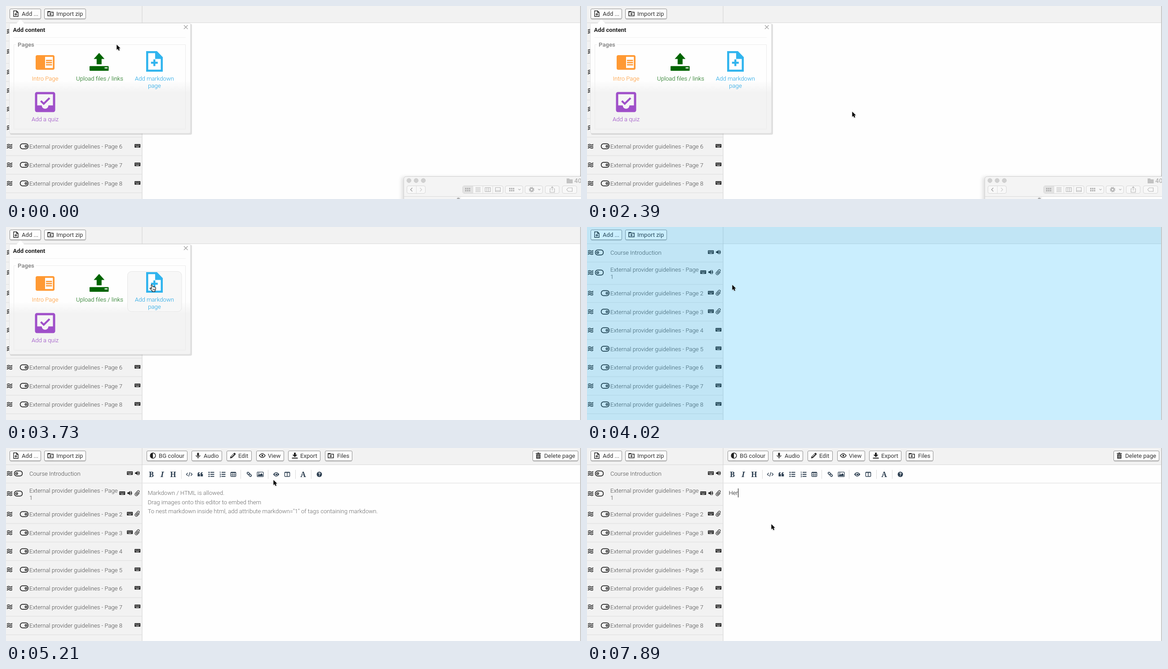
These frames come from a looping animation (1280x432 px, 8 s). An HTML page:

```html
<!DOCTYPE html>
<html lang="en">
<head>
<meta charset="utf-8">
<title>Add markdown page</title>
<style>
html, body { margin: 0; width: 100%; height: 100%; overflow: hidden; background: #fefefe; }
svg { display: block; width: 100%; height: 100%; }
text { font: 300 13.12px Roboto, sans-serif; white-space: pre; }
.btn text { font-weight: 400; fill: #333; }
.bold { font-weight: 700; }
.serif text { font: 700 16.5px "Noto Serif", serif; fill: #2c3e50; text-anchor: middle; }
.mid { text-anchor: middle; }
</style>
</head>
<body>
<svg id="stage" viewBox="0 0 1280 432"></svg>
<script>
const LOOP = 8000, TICK = 148.6;
const NAVY = '#2c3e50', INK = '#222', LABEL = '#484848';

const rect = (x, y, w, h, fill, more = '') =>
  `<rect x="${x}" y="${y}" width="${w}" height="${h}" fill="${fill}" ${more}/>`;
const path = (d, fill = INK, more = '') => `<path d="${d}" fill="${fill}" ${more}/>`;
const line = (d, color = INK, width = 1.5, more = '') =>
  path(d, 'none', `stroke="${color}" stroke-width="${width}" ${more}`);
const text = (x, y, s, fill, cls = '') => `<text x="${x}" y="${y}" fill="${fill}" class="${cls}">${s}</text>`;
const dot = (x, y, r, fill, more = '') => `<circle cx="${x}" cy="${y}" r="${r}" fill="${fill}" ${more}/>`;
const group = (body, more = '') => `<g ${more}>${body}</g>`;
const at = (x, y, body, scale = 1) => group(body, `transform="translate(${x} ${y}) scale(${scale})"`);

// Icons are centred on 0,0
const icon = {
  page: line('M-5 -6.2H1.5L5 -2.7V6.2H-5ZM1.5 -6V-2.5H5', INK, 1.4) + line('M0 -1.5V4.5M-3 1.5H3', INK, 1.4),
  folder: line('M-6 -4.8H-1.5L0 -3.2H6V5H-6Z', INK, 1.5) + path('M-6 -5H-1.5L0 -3H-6Z') + line('M0 -1.6V3.6M-2.6 1H2.6', INK, 1.4),
  contrast: dot(0, 0, 5.9, 'none', `stroke="${INK}" stroke-width="1.5"`) + path('M0 -6A6 6 0 0 0 0 6Z'),
  mic: rect(-2, -6.5, 4, 8.2, INK, 'rx="2"') + line('M-4.3 -1A4.3 4.3 0 0 0 4.3 -1M0 3.3V6.5', INK, 1.4),
  pencil: path('M-6.3 6.3L-5.2 2L2.6 -5.8Q3.6 -6.8 4.6 -5.8L5.8 -4.6Q6.8 -3.6 5.8 -2.6L-2 5.2Z')
    + line('M-3.6 2.7L2.6 -3.5', '#fff', 1.3),
  eye: line('M-6.5 0Q0 -8.6 6.5 0Q0 8.6 -6.5 0Z', INK, 1.4) + dot(0, 0, 2, INK),
  download: path('M-2 -6.5H2V-2H5.5L0 3.5L-5.5 -2H-2Z') + rect(-6.5, 4.6, 13, 2, INK),
  bin: path('M-5.5 -5.5H-2L-1.3 -6.8H1.3L2 -5.5H5.5V-3.8H-5.5ZM-4.6 -2.8H4.6V6.8H-4.6Z')
    + line('M-2.1 -1.3V5.3M0 -1.3V5.3M2.1 -1.3V5.3', '#fff', 0.9),
  keys: rect(-6.5, -4, 13, 8, INK, 'rx="1"') + line('M-5 -2H5.5M-5 0H5.5', '#eee', 1.2, 'stroke-dasharray="1.2 0.9"')
    + line('M-3.2 2.2H3.2', '#eee', 1.1),
  sound: path('M-5.5 -1.8H-3L0.4 -5V5L-3 1.8H-5.5Z') + line('M1.8 -2.2Q3.6 0 1.8 2.2M2 -4.4Q7 0 2 4.4', INK, 1.3),
  clip: group(line('M3.2 -3V3.6A3.2 3.2 0 0 1 -3.2 3.6V-4A2.2 2.2 0 0 1 1.2 -4V3A1 1 0 0 1 -1 3V-3', INK, 1.1),
    'transform="rotate(42)"'),
  waves: line([-3.6, 0, 3.6].map(y => `M-5.8 ${y + 1}Q-3 ${y - 2.2} 0 ${y}T5.8 ${y - 1}`).join(''), INK, 1.6),
};

const toggle = (x, y, on) =>
  rect(x - 8.8, y - 5.6, 17.6, 11.2, 'none', `rx="5.2" stroke="${INK}" stroke-width="1.7"`)
  + dot(x + (on ? 4 : -3.6), y, 2, 'none', `stroke="${INK}" stroke-width="1.7"`);

const button = (x1, x2, ic, ix, tx, label) => group(
  rect(x1 + .5, 8, x2 - x1 - 1, 22.5, '#000', 'opacity=".16" rx="3"')
  + rect(x1 + .5, 6.5, x2 - x1 - 1, 22, '#fdfdfd', 'rx="2.5" stroke="#8c8c8c"')
  + at(ix, 17, icon[ic]) + text(tx, 22, label, '#333'), 'class="btn"');

function row(y, i) {
  const icons = i === 0 ? ['keys', 'sound'] : i === 1 ? ['keys', 'sound', 'clip'] : i < 4 ? ['keys', 'clip'] : ['keys'];
  const label = i === 0 ? text(52, y + 5, 'Course Introduction', LABEL)
    : i === 1 ? text(52, 99.5, 'External provider guidelines - Page', LABEL) + text(52, 115.5, '1', LABEL)
    : text(52, y + 5, 'External provider guidelines - Page ' + i, LABEL);
  return at(8, y, icon.waves) + toggle(i > 1 ? 40.5 : 27.5, y, i > 1) + label
    + icons.map((n, j) => at(292.7 - 17 * (icons.length - 1 - j), y - (i ? 1 : .7), icon[n])).join('')
    + rect(0, i > 1 ? y + 20.5 : i ? 128 : 78, 303, 1, '#dedede');
}

const rowY = i => i === 0 ? 57 : i === 1 ? 102 : 148 + 41.5 * (i - 2);
const base = rect(0, 0, 1280, 432, '#fefefe') + rect(0, 0, 1278, 37, '#f2f2f2')
  + rect(0, 37, 303, 395, '#f2f2f2') + rect(0, 37, 1278, 1, '#dadada')
  + rect(302.5, 0, 1, 432, '#cfcfcf') + rect(1278, 0, 2, 432, '#c9c9c9')
  + Array.from({ length: 9 }, (_, i) => row(rowY(i), i)).join('')
  + button(8, 78, 'page', 22, 35, 'Add ...') + button(85, 178, 'folder', 99, 112, 'Import zip');

const actions = button(313, 404, 'contrast', 327, 340, 'BG colour') + button(413, 481, 'mic', 427.5, 440, 'Audio')
  + button(491, 547, 'pencil', 505, 517, 'Edit') + button(557, 619, 'eye', 570.5, 583, 'View')
  + button(628, 700, 'download', 643, 655, 'Export') + button(710, 771, 'folder', 723, 737, 'Files')
  + button(1172, 1274, 'bin', 1185, 1198, 'Delete page');

const upload = path('M207.3 105L219.3 118.5H212.8V130.5H201.8V118.5H195.3Z', '#006400')
  + rect(186, 134.5, 42.5, 10.5, '#006400', 'rx="1"') + rect(219.5, 137.3, 6.5, 2.4, '#fff');
const intro = rect(66, 110, 42, 32.7, '#ff9933', 'rx="3.8"') + rect(87, 113.8, 17.3, 25, '#fff')
  + line('M89 122H102.5M89 126.8H102.5M89 131.6H102.5', '#ff9933', 2.9);
const markdown = path('M312 101H336L349 114.5V147H312Z', '#30b4ee')
  + path('M316.6 105.5H332V118.5H344.5V142.5H316.6Z', '#fff')
  + line('M330.3 119.5V134.5M322.8 127H337.8', '#30b4ee', 4.4);
const quiz = rect(64.5, 192.5, 45, 45, '#9f4fc9', 'rx="4.5"')
  + path('M69.5 197.5H104.5V222.5H94.5Q93.5 230 87 230T79.5 222.5H69.5Z', '#f6f6f6')
  + line('M77.5 212.5L84 218.8L97 206', '#9f4fc9', 4.2);

const popup = rect(9, 40, 405, 248, '#000', 'opacity=".12" rx="3"')
  + rect(7.5, 38.5, 403, 246.5, 'url(#fade)', 'rx="3" stroke="#e2e2e2"')
  + path('M23 39.5L32 30L41 39.5Z', '#fefefe')
  + text(15.5, 58, 'Add content', INK, 'bold')
  + line('M396 43L404.5 51.5M404.5 43L396 51.5', '#a0a0a0', 1.3)
  + rect(16, 70, 384, 1, '#f1f1f1')
  + line('M22 86.5H17.5V275.5H399.5V86.5H66', '#ebebeb', 1) + text(26, 91, 'Pages', '#8d8d8d', 'bold')
  + rect(270.5, 99.5, 120.5, 90, '#f7f7f7', 'id="hover" rx="9" stroke="#e6e6e6"')
  + intro + upload + markdown + quiz
  + text(87, 167, 'Intro Page', '#ff8f20', 'mid') + text(208.5, 167, 'Upload files / links', '#006400', 'mid')
  + text(330.5, 167, 'Add markdown', '#12a0e4', 'mid') + text(330.5, 183.3, 'page', '#12a0e4', 'mid')
  + text(87, 258, 'Add a quiz', '#9440c2', 'mid');

const GREY = '#b3b3b3';
const box = (x1, x2, split = []) => rect(x1 + .5, 402.5, x2 - x1, 17, '#f8f8f8', 'rx="3.5" stroke="#d6d6d6"')
  + split.map(x => rect(x, 403, 1, 16, '#dedede')).join('');
const squares = (x, y) => [0, 1, 2].map(i => [0, 1].map(j => rect(x + i * 4.2, y + j * 4.6, 3, 3.4, GREY)).join('')).join('');
const finder = rect(881, 383, 420, 60, '#000', 'opacity=".13" filter="url(#soft)"')
  + rect(885.5, 381.5, 410, 70, '#f4f4f4', 'rx="6" stroke="#cfcfcf"')
  + [897, 913, 929].map(x => dot(x, 390.7, 4.8, '#d0d0d0', 'stroke="#bfbfbf" stroke-width=".6"')).join('')
  + path('M1248 386H1253.5L1255 388H1261.5V397H1248Z', '#c2c2c2')
  + `<text x="1265" y="395.5" fill="#aaa" style="font:500 12.5px Inter,sans-serif">400</text>`
  + box(892, 933, [913]) + line('M904.5 407L900.5 411L904.5 415', '#9c9c9c', 1.3) + line('M921.5 407L925.5 411L921.5 415', '#d0d0d0', 1.3)
  + box(1016, 1106, [1039, 1061, 1083]) + rect(1017, 403, 22, 16, '#e3e3e3') + squares(1022, 407)
  + line('M1045 406.5H1056.5M1045 409.5H1056.5M1045 412.5H1056.5M1045 415.5H1056.5', GREY, 1.1)
  + line('M1066.5 406.5H1078.5V415.5H1066.5ZM1070.5 406V416M1074.5 406V416M1089.5 406.5H1100.5V415.5H1089.5ZM1089.5 413H1100.5', GREY, 1.1)
  + box(1111, 1150) + squares(1120, 407) + box(1155, 1194)
  + dot(1170, 411, 3.4, 'none', `stroke="${GREY}" stroke-width="2.6"`)
  + dot(1170, 411, 5.4, 'none', `stroke="${GREY}" stroke-width="1.6" stroke-dasharray="2.1 2.1"`)
  + line('M1140.5 409.5L1143 412L1145.5 409.5M1184.5 409.5L1187 412L1189.5 409.5', GREY, 1.2)
  + box(1200, 1231) + line('M1213 409H1211V417H1221V409H1219M1216 413V405M1213.5 407L1216 404.5L1218.5 407', GREY, 1.1)
  + box(1238, 1270) + line('M1248 411L1251.5 407H1260.5V415H1251.5Z', GREY, 1.1)
  + rect(885.5, 426, 400, 1, '#d9d9d9') + rect(1013, 427, 270, 5, '#fefefe') + dot(1007, 432, 3.3, '#b0b0b0');

const tool = (x, body) => at(x, 59, body);
const lines = line([-4.5, 0, 4.5].map(y => `M-2 ${y}H6.5`).join(''), NAVY, 2);
const frame = rect(-5.6, -4.8, 11.2, 9.6, 'none', `rx="1" stroke="${NAVY}" stroke-width="1.4"`);
const tools = rect(304, 38, 974, 40, '#fefefe') + rect(304, 78, 974, 1, '#dcdcdc')
  + [390, 522, 583, 644, 679].map(x => rect(x, 49, 1, 20, '#d9d9d9')).join('')
  + group(text(323.5, 65, 'B', NAVY) + `<text x="347.5" y="65" style="font-style:italic">I</text>`
    + text(372, 65, 'H', NAVY) + text(661.5, 65, 'A', NAVY), 'class="serif"')
  + tool(408, line('M-3.4 -3.2L-6.4 0L-3.4 3.2M3.4 -3.2L6.4 0L3.4 3.2M1.4 -4.8L-1.4 4.8', NAVY, 1.4))
  + tool(432.5, [-6, .6].map(x => path(`M${x} -1Q${x} -5 ${x + 4.5} -4.8V-3.2Q${x + 2.6} -3 ${x + 2.6} -.8H${x + 5.2}V4.4H${x}Z`, NAVY)).join(''))
  + tool(457, lines + [-4.5, 0, 4.5].map(y => dot(-5, y, 1.5, NAVY)).join(''))
  + tool(482, lines + line('M-6.2 -5L-5 -6V-2.8M-6.3 -.8H-4V.8H-6M-6.3 3.2H-4V5.8H-6.3', NAVY, 1))
  + tool(506, frame + line('M-5.6 -4H5.6', NAVY, 2) + line('M-5.6 1H5.6M-1.9 -4V5M1.9 -4V5', NAVY, 1.1))
  + tool(541.5, group([-2.9, 2.9].map(x => rect(x - 3, -2, 6, 4, 'none', `rx="2" stroke="${NAVY}" stroke-width="1.6"`)).join(''),
    'transform="rotate(45)"'))
  + tool(566, rect(-6.8, -5.2, 13.6, 10.4, 'none', `rx="1" stroke="${NAVY}" stroke-width="1.3"`)
    + path('M-5.4 3.8V1.6L-2.6 -1L-.8 .8L2.5 -2.6L5.4 .4V3.8Z', NAVY) + dot(-3.2, -2.5, 1.2, NAVY))
  + tool(601.5, path('M-6.8 0Q0 -9.6 6.8 0Q0 9.6 -6.8 0Z', NAVY) + dot(0, 0, 3.2, '#fff') + dot(.3, .3, 2, NAVY))
  + tool(626, frame + line('M-5.6 -4.3H5.6', NAVY, 1.8) + line('M0 -4V5', NAVY, 1.4))
  + tool(697.5, dot(0, 0, 5.9, NAVY) + `<text class="mid" y="3.9" fill="#fff" style="font-weight:700;font-size:10.5px">?</text>`);

const hint = ['Markdown / HTML is allowed.', 'Drag images onto this editor to embed them',
  'To nest markdown inside html, add attribute markdown="1" of tags containing markdown.']
  .map((s, i) => text(315.5, 105 + 20.5 * i, s, '#666')).join('');

const arrow = at(.4, .6, path('M0 0V13.6L3.1 10.8L5.3 15.8L7.9 14.7L5.7 9.8H9.8Z', '#000',
  'stroke="#fff" stroke-width="1" paint-order="stroke" filter="url(#drop)"'), .84);
const hand = path('M0 1.2Q1.3 -.6 2.6 1.2L3.6 5Q5 4 5.9 5.2Q7.4 4.4 8.2 5.8Q10 5.4 10.2 7V10.5L8.6 13V15.5H2.4V13.6L-2.6 8.6Q-2.8 6.8 -.6 7.6L1.4 9Z',
  '#fff', 'stroke="#000" stroke-width="1.1" stroke-linejoin="round"') + line('M4.3 9.2V12.6M6.2 9.2V12.6M8 9.2V12.6', '#000', .8);

const stage = document.getElementById('stage');
stage.innerHTML = `<defs>
  <linearGradient id="fade" x2="0" y2="1"><stop offset=".52" stop-color="#fefefe"/><stop offset=".63" stop-color="#f3f3f3"/></linearGradient>
  <filter id="soft" x="-10%" y="-60%" width="120%" height="220%"><feGaussianBlur stdDeviation="4"/></filter>
  <filter id="drop" x="-50%" y="-30%" width="200%" height="170%"><feDropShadow dx="0" dy="1" stdDeviation="1" flood-opacity=".25"/></filter>
  </defs>` + base + group(actions, 'id="actions"') + group(popup, 'id="popup"') + group(finder, 'id="finder"')
  + group(tools + group(hint, 'id="hint"') + `<text id="typed" x="315.5" y="105" fill="#111"/>`
    + rect(315, 90.5, 1.2, 20, '#222', 'id="caret"'), 'id="editor"')
  + rect(0, 0, 1278, 432, '#00b0ff', 'id="flash" opacity=".205"')
  + group(group(arrow, 'id="arrow"') + group(hand, 'id="hand"'), 'id="cursor"');

const $ = Object.fromEntries([...stage.querySelectorAll('g[id],rect[id],text[id]')].map(e => [e.id, e]));
const show = (id, on) => { $[id].style.display = on ? '' : 'none'; };

// Pointer stops: tick, x, y
const stops = [[0, 246, 86], [1, 214, 62], [2, 262, 33], [4, 680, 150], [6, 1150, 350], [7, 1254, 383],
  [9, 1262, 398], [11, 1285, 436], [15, 1285, 436], [16, 590, 236], [18, 590, 236], [21, 385, 146],
  [23, 323, 129], [28, 323, 129], [31, 515, 14], [32, 515, 14], [34, 690, 12], [36, 500, 130], [38, 410, 170]];

function pointer(k) {
  const i = stops.findIndex(s => s[0] > k);
  if (i < 0) return stops[stops.length - 1].slice(1);
  const [a, x, y] = stops[i - 1], [b, u, v] = stops[i], p = (k - a) / (b - a);
  return [x + (u - x) * p, y + (v - y) * p];
}

function draw(t) {
  const k = Math.floor((t + 6) / TICK);
  const [x, y] = pointer(k);
  const over = k < 27 && x > 270 && x < 391 && y > 99 && y < 189;
  const typed = 'Her'.slice(0, Math.max(0, k - 50));
  $.cursor.setAttribute('transform', `translate(${x} ${y})`);
  show('arrow', !over);
  show('hand', over);
  show('hover', over);
  show('popup', k < 27);
  show('finder', k < 18);
  show('flash', k === 27);
  show('actions', k > 27);
  show('editor', k > 31);
  show('hint', !typed);
  $.typed.textContent = typed;
  $.caret.setAttribute('x', 315 + (typed ? $.typed.getComputedTextLength() + .5 : 0));
  show('caret', !(k >= 35 && k < 38 || k >= 42 && k < 45 || k === 49 || k === 50));
}

function loop() {
  draw(performance.now() % LOOP);
  requestAnimationFrame(loop);
}
loop();
</script>
</body>
</html>
```
